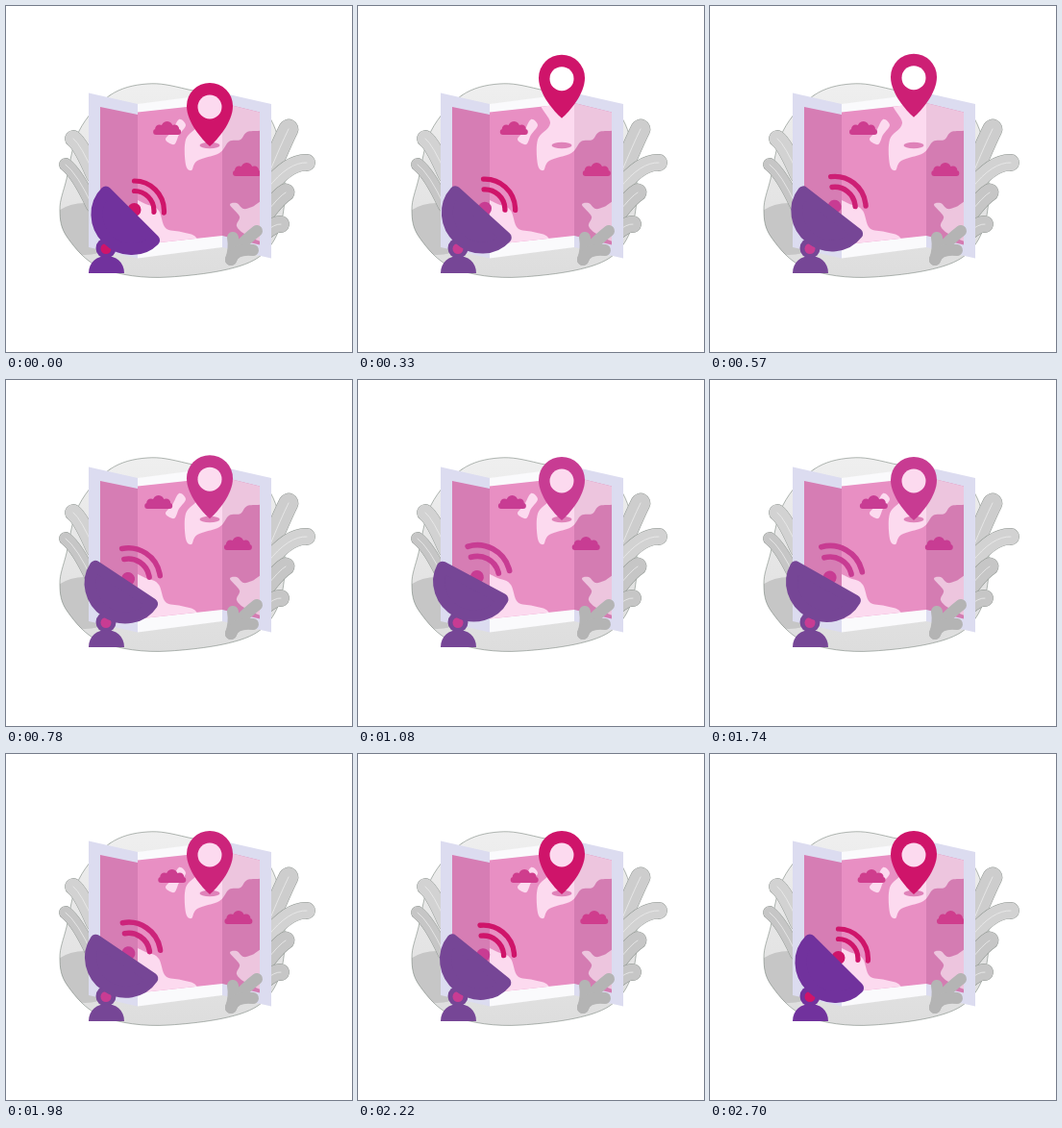
An HTML page with a canvas that plays this animation: 360 by 360 pixels, repeating every 2730 ms.

```html
<!DOCTYPE html>
<html>
<head>
<meta charset="utf-8">
<style>
  html, body { margin: 0; width: 100%; height: 100%; overflow: hidden; background: #fff; }
  canvas { display: block; width: 360px; height: 360px; }
</style>
</head>
<body>
<canvas id="stage" width="360" height="360"></canvas>
<script>
const ctx = document.getElementById('stage').getContext('2d');
const LOOP = 2730, STEP = 30, TAU = Math.PI * 2, RAD = TAU / 360;
const LAND = '#fcdaef', LEAF = '#c6c6c6';

const ease = (t, from, to) => {
  const u = Math.min(1, Math.max(0, (t - from) / (to - from)));
  return u * u * (3 - 2 * u);
};
const mix = (a, b, k) => `rgb(${a.map((v, i) => Math.round(v + (b[i] - v) * k))})`;

function fill(path, color) {
  ctx.fillStyle = color;
  ctx.fill(path);
}

function clipped(path, paint) {
  ctx.save();
  ctx.clip(path);
  paint();
  ctx.restore();
}

function disc(x, y, rx, color, ry = rx) {
  ctx.fillStyle = color;
  ctx.beginPath();
  ctx.ellipse(x, y, rx, ry, 0, 0, TAU);
  ctx.fill();
}

// Closed Catmull-Rom curve through a few key points written as "x,y x,y ...".
function curve(text) {
  const p = text.split(' ').map(s => s.split(',').map(Number));
  const at = i => p[(i + p.length) % p.length];
  const path = new Path2D();
  path.moveTo(...p[0]);
  p.forEach((a, i) => {
    const b = at(i + 1), before = at(i - 1), after = at(i + 2);
    path.bezierCurveTo(
      a[0] + (b[0] - before[0]) / 6, a[1] + (b[1] - before[1]) / 6,
      b[0] - (after[0] - a[0]) / 6, b[1] - (after[1] - a[1]) / 6, ...b);
  });
  return path;
}

// A folded strip zigzags up and down: each panel joins two neighbouring folds.
function foldedPanels(margin, top, bottom, dip) {
  const xs = [86 + margin, 137, 225, 276 - margin];
  const shift = i => (i % 2 ? dip : 0);
  return [0, 1, 2].map(i => {
    const path = new Path2D();
    path.moveTo(xs[i], top + shift(i));
    path.lineTo(xs[i + 1], top + shift(i + 1));
    path.lineTo(xs[i + 1], bottom + shift(i + 1));
    path.lineTo(xs[i], bottom + shift(i));
    path.closePath();
    return path;
  });
}

const frames = foldedPanels(0, 90.5, 251, 11.5);
const sheets = foldedPanels(12, 101, 239, 9.5);
sheets[0] = foldedPanels(12, 105, 240, 8)[0];
const frameColors = ['#dcdcf0', '#fafafc', '#dcdcf0'];
const sheetColors = ['#d67db4', '#e88fc3', '#d47cb2'];

const blob = curve('108,93 147,81 190,87 270,110 290,200 262,262 170,282 100,273 64,241 56,212 63,180 76,130');
const lands = [
  '193,96 200,122 187,139 187,165 193,171 199,161 222,153 232,141 244,139 251,131 270,126 270,92',
  '180,118 187,124 180,134 175,144 166,139 173,130',
  '125,204 148,207 159,213 166,231 182,235 198,241 200,262 125,262',
  '233,207 240,205 247,211 256,209 270,204 270,243 250,238 240,229 243,219'
].map(curve);

function stroke(x0, y0, cx, cy, x1, y1, width, color) {
  ctx.lineCap = 'round';
  ctx.lineWidth = width;
  ctx.strokeStyle = color;
  ctx.beginPath();
  ctx.moveTo(x0, y0);
  ctx.quadraticCurveTo(cx, cy, x1, y1);
  ctx.stroke();
}

// Rounded leaf lobe from tip to root with a pale vein.
function lobe(x, y, bendX, bendY, rootX, rootY, width, color) {
  for (const [w, c] of [[width + 0.8, '#8d948f'], [width, color], [0.8, '#ededed']])
    stroke(x, y, bendX, bendY, rootX, rootY, w, c);
}

function drawBackdrop() {
  const shade = ctx.createLinearGradient(0, 80, 0, 283);
  shade.addColorStop(0, '#efefef');
  shade.addColorStop(1, '#dddddd');
  fill(blob, shade);
  clipped(blob, () => disc(82, 232, 38, LEAF, 27));
  ctx.lineWidth = 0.6;
  ctx.strokeStyle = '#7c8780';
  ctx.stroke(blob);

  lobe(70, 138, 78, 144, 92, 176, 17, '#d2d2d2');
  lobe(62, 165, 74, 174, 90, 208, 13, LEAF);
  lobe(294, 128, 287, 142, 272, 178, 20, '#cdcdcd');
  lobe(313, 163, 294, 162, 272, 190, 17, '#d2d2d2');
  lobe(291, 194, 284, 198, 270, 216, 18, LEAF);
  lobe(286, 227, 280, 226, 268, 236, 17, LEAF);
}

function drawCloud(x, y, color) {
  const cloud = new Path2D();
  cloud.roundRect(x - 14.5, y, 29, 6, 3);
  for (const side of [-1, 0, 1]) {
    const r = side ? 4.5 : 6, cx = x + side * 8, cy = side ? y : y - 2;
    cloud.moveTo(cx + r, cy);
    cloud.arc(cx, cy, r, 0, TAU);
  }
  fill(cloud, color);
}

function drawMap(t, sway, color) {
  frames.forEach((frame, i) => {
    fill(frame, frameColors[i]);
    fill(sheets[i], sheetColors[i]);
    if (i) clipped(sheets[i], () => lands.forEach(land => fill(land, i === 1 ? LAND : '#edc5de')));
  });
  disc(212, 145, 10.5, '#df82b9', 3.2);

  drawCloud(166 - 7.3 * Math.cos(TAU * (t - 780) / LOOP), 128, color);
  const mapArea = new Path2D();
  mapArea.rect(0, 0, 264, 360);
  clipped(mapArea, () => drawCloud(250.5 - 15 * sway, 171, color));

  for (const [x, y] of [[236, 241], [261, 234], [257, 254]])
    stroke(x, y, 238, 252, 234, 264, 12, '#b4b4b4');
}

function drawPin(lift, color) {
  const y = 104 - lift, pin = new Path2D();
  pin.moveTo(212, y + 42);
  pin.bezierCurveTo(204, y + 35, 188, y + 17, 188, y);
  pin.arc(212, y, 24, Math.PI, 0);
  pin.bezierCurveTo(236, y + 17, 220, y + 35, 212, y + 42);
  fill(pin, color);
  disc(212, y + 1, 12.5, mix([252, 218, 239], [255, 255, 255], Math.min(1, lift / 25)));
}

function drawDish(sway, purple, red, knob) {
  ctx.save();
  ctx.translate(100, 248);
  ctx.rotate(-19 * sway * RAD);
  ctx.translate(32.5, -33);

  ctx.save();
  ctx.translate(1 + 2 * sway, -3 + 2 * sway);
  disc(0, 0, 7, knob);
  ctx.scale(1 + 0.12 * sway, 1 + 0.12 * sway);
  ctx.strokeStyle = red;
  ctx.lineWidth = 5.2;
  ctx.lineCap = 'round';
  for (const r of [20.5, 31]) {
    ctx.beginPath();
    ctx.arc(0, 1, r, -90 * RAD, 4 * RAD);
    ctx.stroke();
  }
  ctx.restore();

  ctx.rotate(45 * RAD);
  ctx.beginPath();
  ctx.ellipse(0, 5, 35.5, 33.5, 0, 0, Math.PI);
  ctx.closePath();
  ctx.fillStyle = ctx.strokeStyle = purple;
  ctx.lineJoin = 'round';
  ctx.lineWidth = 12;
  ctx.fill();
  ctx.stroke();
  ctx.restore();
}

function drawBase(purple, knob) {
  disc(104, 252, 10.5, purple);
  const dome = new Path2D();
  dome.moveTo(86, 278);
  dome.bezierCurveTo(86, 254, 123, 254, 123, 278);
  fill(dome, purple);
  disc(104, 252.5, 5.5, knob);
}

function draw(t) {
  const sway = ease(t, 0, LOOP / 2) - ease(t, LOOP / 2, LOOP);
  const fade = ease(t, 400, 900) - ease(t, 1700, 2200);
  const dishFade = ease(t, 0, 300) - ease(t, 2300, 2700);
  const lift = 34 * (ease(t, 0, 430) - ease(t, 505, 825));
  const vivid = [207, 20, 106], soft = [200, 60, 147];
  const red = mix(vivid, soft, fade), knob = mix(vivid, soft, dishFade);
  const purple = mix([113, 50, 157], [118, 70, 150], dishFade);

  ctx.fillStyle = '#fff';
  ctx.fillRect(0, 0, 360, 360);
  drawBackdrop();
  drawMap(t, sway, mix([207, 61, 141], soft, fade));
  drawPin(lift, red);
  drawBase(purple, knob);
  drawDish(sway, purple, red, knob);
}

const start = performance.now();
function tick() {
  const t = Math.max(0, performance.now() - start) % LOOP;
  draw(Math.floor(t / STEP) * STEP);
  requestAnimationFrame(tick);
}
tick();
</script>
</body>
</html>
```
